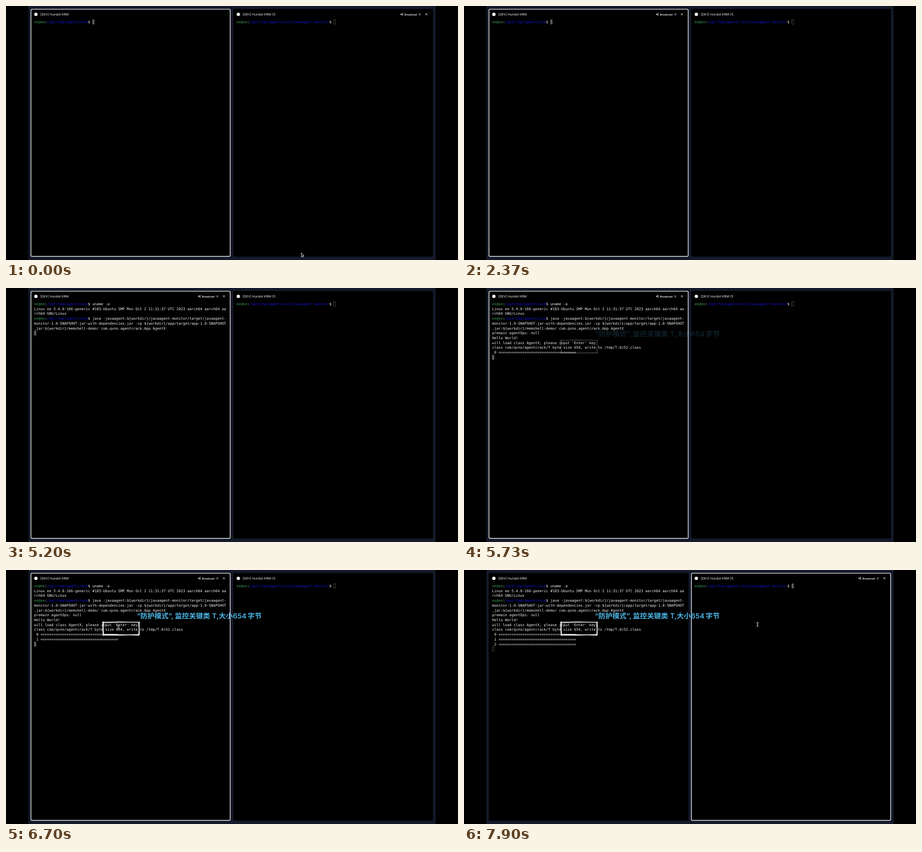
Write an HTML page with a canvas that moves like this. It is 998x561 px and loops after 8000 ms.

```html
<!DOCTYPE html>
<html lang="en">
<head>
<meta charset="utf-8">
<title>Split terminal</title>
<style>
  html, body { margin: 0; width: 100%; height: 100%; overflow: hidden; background: #000; }
  canvas { display: block; }
</style>
</head>
<body>
<canvas id="stage" width="998" height="561"></canvas>
<script>
const ctx = document.getElementById('stage').getContext('2d');
const LOOP = 8000;
const COLS = 89, CELL_W = 4.764, LINE_H = 10.72;
const SHIFT = 447; // distance between the two panes
const MONO = '7.91px "DejaVu Sans Mono", monospace';
const SANS = 'Inter, "Noto Sans CJK SC", "Noto Sans CJK", sans-serif';
const WHITE = '#f4f4f4', GREEN = '#35964a', BLUE = '#1414d2';

const USER = 'ee@ee';
const LEFT_DIR = '/opt/tmp/agentcrack';
const RIGHT_DIR = LEFT_DIR + '/javaagent-monitor';
const UNAME = 'uname -a';
const KERNEL = 'Linux ee 5.4.0-166-generic #183-Ubuntu SMP Mon Oct 2 11:31:37 UTC 2023 aarch64 aarch64 aarch64 GNU/Linux';
const JAVA = 'java -javaagent:${workdir}/javaagent-monitor/target/javaagent-monitor-1.0-SNAPSHOT-jar-with-dependencies.jar' +
  ' -cp ${workdir}/app/target/app-1.0-SNAPSHOT.jar:${workdir}/memshell-demo/ com.qvno.agentcrack.App AgentX';

const KEY_TIMES = [2400, 2600, 2670, 2770, 2870, 2970, 3070, 3170];
const BAR = ' <' + '='.repeat(35);
const OUTPUT = [
  [5570, 'premain agentOps: null'],
  [5600, 'Hello World!'],
  [5600, "will load class AgentX, please input 'Enter' key"],
  [5670, 'class com/qvno/agentcrack/T byte size 654, write to /tmp/T.6c52.class'],
  [5700, ' 0' + BAR],
  [6700, ' 1' + BAR],
  [7700, ' 2' + BAR]
];
const T = { uname: 3370, up: 4330, up2: 4500, run: 5200, focus: 7870 };

// Pointer paths: time, x, y
const PATHS = [
  [[0, 652, 545], [30, 652, 545], [600, 334, 275], [1130, 334, 275], [1230, 333, 273], [2370, 333, 273]],
  [[6000, 333, 273], [6130, 290, 338], [6370, 249, 158], [6470, 248.5, 126.5], [6700, 248.5, 126.5],
   [7100, 350, 172], [7500, 474, 168], [7850, 648, 120], [8000, 648, 120]]
];

const clamp = v => Math.max(0, Math.min(1, v));
const smooth = v => v * v * (3 - 2 * v);

function pointerAt(t) {
  const path = PATHS.find(p => t >= p[0][0] && t < p[p.length - 1][0]);
  if (!path) return null;
  const i = path.findIndex(k => k[0] > t);
  const [t0, x0, y0] = path[i - 1], [t1, x1, y1] = path[i];
  const k = smooth((t - t0) / (t1 - t0));
  return { x: x0 + (x1 - x0) * k, y: y0 + (y1 - y0) * k };
}

function line(points, color, width) {
  ctx.beginPath();
  points.forEach(([x, y], i) => i ? ctx.lineTo(x, y) : ctx.moveTo(x, y));
  ctx.strokeStyle = color;
  ctx.lineWidth = width;
  ctx.stroke();
}

function disc(x, y, r, color) {
  ctx.fillStyle = color;
  ctx.beginPath();
  ctx.arc(x, y, r, 0, Math.PI * 2);
  ctx.fill();
}

function label(text, x, y, font, color) {
  ctx.font = font + ' ' + SANS;
  ctx.fillStyle = color;
  ctx.fillText(text, x, y);
}

// Writes on the character grid with wrapping; returns the cell after the text.
function write(text, cell, color) {
  ctx.font = MONO;
  ctx.fillStyle = color;
  for (const ch of text) {
    const x = 62 + (cell.col * CELL_W), y = 38 + cell.row * LINE_H;
    if (ch !== ' ') ctx.fillText(ch, x, y);
    if (++cell.col === COLS) { cell.col = 0; cell.row++; }
  }
  return cell;
}

function newline(cell) {
  cell.col = 0;
  cell.row++;
}

function prompt(dir, cell) {
  write(USER, cell, GREEN);
  write(':', cell, WHITE);
  write(dir, cell, BLUE);
  write('$ ', cell, WHITE);
}

function caret(cell, focused) {
  const x = 62 + cell.col * CELL_W, y = 29.8 + cell.row * LINE_H;
  if (focused) {
    ctx.fillStyle = '#5c5c5c';
    ctx.fillRect(x, y, CELL_W, LINE_H);
  } else {
    ctx.strokeStyle = '#565656';
    ctx.lineWidth = 0.8;
    ctx.strokeRect(x + 0.4, y + 0.4, CELL_W - 0.8, LINE_H - 0.8);
  }
}

function leftSession(t) {
  const cell = { row: 0, col: 0 };
  const typed = KEY_TIMES.filter(k => t >= k).length;
  prompt(LEFT_DIR, cell);
  write(UNAME.slice(0, typed), cell, WHITE);
  if (t >= T.uname) {
    newline(cell);
    write(KERNEL, cell, WHITE);
    newline(cell);
    prompt(LEFT_DIR, cell);
    if (t >= T.up) write(t >= T.up2 ? JAVA : UNAME, cell, WHITE);
  }
  if (t >= T.run) {
    newline(cell);
    for (const [at, text] of OUTPUT) {
      if (t < at) break;
      write(text, cell, WHITE);
      newline(cell);
    }
  }
  return cell;
}

function rightSession() {
  const cell = { row: 0, col: 0 };
  prompt(RIGHT_DIR, cell);
  return cell;
}

function broadcast() {
  disc(425, 18.4, 1.1, WHITE);
  line([[425, 18.4], [430, 18.4]], WHITE, 0.8);
  line([[430, 16.1], [427.4, 16.1], [427.4, 20.7], [430, 20.7]], WHITE, 0.8);
  label('Broadcast', 432.7, 20.5, '600 5.7px', WHITE);
  disc(466.5, 18.4, 2.6, '#4b4b54');
  line([[479, 16.1], [483.4, 20.5]], WHITE, 1);
  line([[483.4, 16.1], [479, 20.5]], WHITE, 1);
}

function pane(offset, title, session, focused, hovered) {
  ctx.save();
  ctx.translate(offset, 0);
  ctx.beginPath();
  ctx.roundRect(54.5, 6.5, 441.3, 547, 3);
  ctx.fillStyle = '#000';
  ctx.fill();
  if (focused) {
    ctx.beginPath();
    ctx.roundRect(55.2, 7.1, 439.8, 545.9, 2.6);
    ctx.strokeStyle = '#fff';
    ctx.lineWidth = 1.4;
    ctx.stroke();
  }
  disc(66, 18.4, 3.7, WHITE);
  label(title, 75.8, 20.9, '400 6.95px', WHITE);
  if (hovered) broadcast();
  caret(session(), focused);
  ctx.restore();
}

function note(t) {
  const alpha = clamp((t - 5600) / 750);
  if (!alpha) return;
  ctx.save();
  ctx.globalAlpha = alpha;
  const parts = [['“防护模式”,', 289], ['监控关键类', 373], ['T,大小', 455], ['654', 501], ['字节', 533.5]];
  for (const [text, x] of parts) label(text, x, 106.6, '600 15.5px', '#4db6e6');
  line([[212.5, 115.2], [254, 114.6], [296, 116]], '#fff', 1.2);
  line([[214, 117], [250, 115.4], [294, 115]], '#fff', 1);
  line([[214.4, 114], [214.2, 130], [215, 145]], '#fff', 2.4);
  line([[214, 143.8], [250, 144], [295, 142.6]], '#fff', 1.6);
  line([[215, 142.2], [255, 142.8], [294, 144.2]], '#fff', 1.3);
  line([[292.8, 116], [293.8, 130], [293.2, 144.5]], '#fff', 1.6);
  line([[295, 114], [294.2, 128], [294.6, 143]], '#fff', 0.9);
  ctx.restore();
}

function arrow() {
  ctx.beginPath();
  [[0, 0], [0, 8.6], [2, 6.8], [3.3, 9.7], [4.6, 9.1], [3.4, 6.3], [6, 6.2]]
    .forEach(([x, y], i) => i ? ctx.lineTo(x, y) : ctx.moveTo(x, y));
  ctx.closePath();
  ctx.fillStyle = '#000';
  ctx.fill();
  ctx.strokeStyle = '#fff';
  ctx.lineWidth = 0.9;
  ctx.stroke();
}

function beam() {
  for (const [color, width] of [['#e8e8e8', 2.2], ['#000', 0.8]]) {
    line([[-2, -4.2], [0, -3.4], [2, -4.2]], color, width);
    line([[0, -3.4], [0, 3.4]], color, width);
    line([[-2, 4.2], [0, 3.4], [2, 4.2]], color, width);
  }
}

function pointer(p) {
  ctx.save();
  ctx.translate(p.x, p.y);
  if (p.y > 540) arrow(); else beam();
  ctx.restore();
}

function draw(t) {
  const p = pointerAt(t);
  const hoverRight = !!p && p.x > 498;
  const focusRight = t >= T.focus;
  ctx.textRendering = 'geometricPrecision';
  ctx.fillStyle = '#000';
  ctx.fillRect(0, 0, 998, 561);
  ctx.fillStyle = '#141a2a';
  ctx.fillRect(49.5, 0, 899, 561);
  pane(0, '[DEV] Hundot KRM', () => leftSession(t), !focusRight, !hoverRight);
  pane(SHIFT, '[DEV] Hundot KRM (1)', rightSession, focusRight, hoverRight);
  note(t);
  if (p) pointer(p);
}

const start = performance.now();
function tick() {
  draw((performance.now() - start) % LOOP);
  requestAnimationFrame(tick);
}
tick();
</script>
</body>
</html>
```
